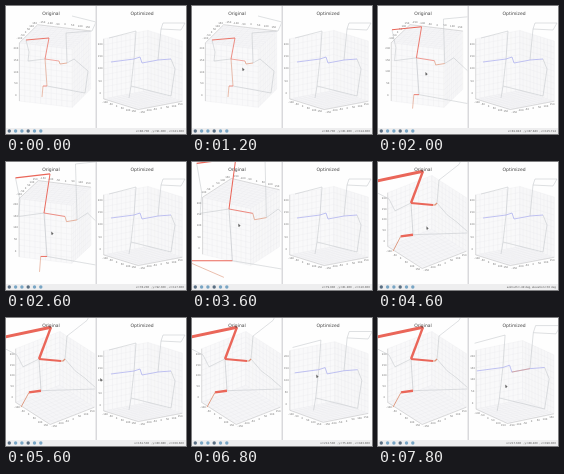
These frames come from a looping animation (180 by 128 pixels, 8000 ms). An HTML page with a canvas:

```html
<!DOCTYPE html>
<html lang="en">
<head>
<meta charset="utf-8">
<style>
html, body { margin: 0; width: 100%; height: 100%; overflow: hidden; background: #fff; }
canvas { display: block; width: 100vw; height: 100vh; }
</style>
</head>
<body>
<canvas id="stage"></canvas>
<script>
const W = 180, H = 128, LOOP = 8000, STEP = 200;
const canvas = document.getElementById('stage');
const ctx = canvas.getContext('2d');
const FONT = '"DejaVu Sans", sans-serif';
const GRAY = '#bcc0c5', RED = '#ea6659', ORANGE = '#dd9478', BLUE = '#a6a9ee';
const BASE = 56, TALL = 62;

// Joint position, zoom and tilt of the graph; turn and rise of the box in degrees.
const leftViews = [
  { t: 1200, x: 39, y: 53, zx: 1, zy: 1, tilt: 0, turn: 71, rise: -20, pen: 0.9 },
  { t: 2600, x: 38, y: 51, zx: 1.5, zy: 1.75, tilt: 0, turn: 70, rise: -20, pen: 1.2 },
  { t: 3600, x: 37, y: 47, zx: 1.7, zy: 2.2, tilt: 0, turn: 59, rise: -23, pen: 1.3 },
  { t: 4600, x: 33, y: 41, zx: 2, zy: 2, tilt: 1, turn: 52, rise: 30, pen: 3 }
];
const rightViews = [
  { t: 6200, x: 137, y: 64, zx: 1, zy: 1, tilt: 0, turn: 52, rise: 14 },
  { t: 7800, x: 135, y: 62, zx: 1.13, zy: 1.13, tilt: 0, turn: 56, rise: 18 }
];
const cursorViews = [
  { t: 0, x: 51, y: 70 }, { t: 1200, x: 51, y: 63 },
  { t: 2600, x: 46, y: 71 }, { t: 3600, x: 47, y: 63 },
  { t: 5000, x: 50, y: 67 }, { t: 6000, x: 125, y: 58 },
  { t: 6800, x: 125, y: 58 }, { t: 7800, x: 128, y: 68 }
];

// Nodes are offsets from the joint, followed by the shift at full tilt.
const leftNodes = {
  start: [-19, -19, -6, 10], bend: [4, -21, 2, 6], joint: [0, 0],
  step: [14, 2, -3, -1], drop: [15, 5, -3, -4], end: [22, 4, -9, -4],
  base: [2, 27, -1, -10], heel: [-2, 27, -3, -9], toe: [-3, 38, -6, -11],
  w1: [-16, -7, 5, 5], w2: [-17, 2, 9, 2],
  e1: [29, 0, -11, 6], e2: [43, 12, -20, -2], e3: [40, 34, -11, -18],
  n1: [21, -26, -7, 15], n2: [47, -28, -23, 10], n3: [51, -37, -23, 12], n4: [27, -43, 3, 13]
};
const rightNodes = {
  start: [-34, -32], bend: [-7, -39], joint: [-9, -11],
  base: [-12, 16], toe: [-14, 28], west: [-32, -8],
  rise: [-3, -13], drop: [-1, -7], end: [15, -10], tip: [28, -11],
  e1: [28, 26], e2: [32, -1],
  n1: [18, -41], n2: [38, -40], n3: [42, -47], n4: [20, -47]
};

const rad = deg => deg * Math.PI / 180;
const lerp = (a, b, k) => a + (b - a) * k;
const mix = (a, b, k) => [lerp(a[0], b[0], k), lerp(a[1], b[1], k)];
const bump = (t, mid, width) => Math.exp(-(((t - mid) / width) ** 2));

function viewAt(views, t) {
  const next = views.findIndex(v => v.t > t);
  if (next === 0) return views[0];
  if (next < 0) return views[views.length - 1];
  const a = views[next - 1], b = views[next];
  const k = (t - a.t) / (b.t - a.t);
  return Object.fromEntries(Object.keys(a).map(key => [key, lerp(a[key], b[key], k)]));
}

// Parts above the joint grow faster when zoomed, as they come nearer.
function place([x, y, dx = 0, dy = 0], v) {
  const py = y + dy * v.tilt;
  const near = 1 - 0.004 * (v.zy - 1) * py;
  return [v.x + (x + dx * v.tilt) * v.zx, v.y + py * v.zy * near];
}

function placeAll(nodes, v) {
  return Object.fromEntries(Object.entries(nodes).map(([name, n]) => [name, place(n, v)]));
}

function stroke(points, color, width) {
  ctx.beginPath();
  points.forEach(p => ctx.lineTo(...p));
  ctx.strokeStyle = color;
  ctx.lineWidth = width;
  ctx.stroke();
}

function path(nodes, names, color, width) {
  stroke(names.split(' ').map(n => nodes[n]), color, width);
}

function text(s, x, y, size, color, align = 'center') {
  ctx.font = size + 'px ' + FONT;
  ctx.fillStyle = color;
  ctx.textAlign = align;
  ctx.textBaseline = 'middle';
  ctx.fillText(s, x, y);
}

function pane(a, b, c, d, fill) {
  ctx.beginPath();
  [a, b, c, d].forEach(p => ctx.lineTo(...p));
  ctx.closePath();
  ctx.fillStyle = fill;
  ctx.fill();
  for (let k = 0; k <= 1.01; k += 0.1) {
    stroke([mix(a, b, k), mix(d, c, k)], '#e6e6e9', 0.3);
    stroke([mix(a, d, k), mix(b, c, k)], '#e6e6e9', 0.3);
  }
}

function edgeLabels(a, b, count, dx, dy, value) {
  for (let i = 0; i < count; i++) {
    const p = mix(a, b, (i + 0.5) / count);
    text(value(i), p[0] + dx, p[1] + dy, 2.5, '#666');
  }
}

// The level pane is the ceiling when the box is seen from below.
function drawBox(cx, cy, v) {
  const turn = rad(v.turn), rise = rad(v.rise);
  const side = v.rise < 0 ? 1 : -1;
  const corner = (x, y, z) => {
    const depth = y * Math.cos(turn) - x * Math.sin(turn);
    return [
      cx + (x * Math.cos(turn) + y * Math.sin(turn)) * BASE / 2,
      cy - z * Math.cos(rise) * TALL / 2 - depth * Math.sin(rise) * BASE / 2
    ];
  };
  const [a, c, b, d] = [[-1, -1], [-1, 1], [1, 1], [1, -1]].map(p => corner(...p, side));
  const [a2, c2, b2] = [[-1, -1], [-1, 1], [1, 1]].map(p => corner(...p, -side));
  pane(a, c, c2, a2, '#f9f9fa');
  pane(c, b, b2, c2, '#f7f7f8');
  pane(a, c, b, d, '#f5f5f7');
  stroke([a2, a, d, b], '#999', 0.3);
  edgeLabels(a, d, 6, -1.5, -side * 3, i => String(i * 50 - 100));
  edgeLabels(d, b, 7, 1, -side * 3, i => String(i * 50 - 150));
  const [top, base] = side > 0 ? [a, a2] : [a2, a];
  edgeLabels(top, base, 5, -3.5, 0, i => String(200 - i * 50));
}

function drawLeft(t) {
  const v = viewAt(leftViews, t);
  drawBox(49, 60, v);
  const n = placeAll(leftNodes, v);
  // The lower branch sweeps past the viewer during the turn.
  n.heel[0] -= 40 * bump(t, 3600, 450);
  path(n, 'start w1 w2 joint', GRAY, 0.5);
  path(n, 'end e1 e2 e3 base', GRAY, 0.5);
  path(n, 'end n1 n2 n3 n4', GRAY, 0.5);
  path(n, 'joint base', t < 2000 ? ORANGE : GRAY, 0.6);
  path(n, 'start bend', RED, v.pen);
  path(n, 'bend joint', RED, v.pen * 0.8);
  path(n, 'joint step', RED, v.pen * 0.6);
  path(n, 'step drop end', ORANGE, Math.max(0.7, v.pen * 0.4));
  path(n, 'base heel', RED, v.pen * 0.8);
  path(n, 'heel toe', ORANGE, Math.max(0.6, v.pen * 0.3));
  text('Original', 45, 8, 4.5, '#444');
}

function drawRight(t) {
  const v = viewAt(rightViews, t);
  drawBox(137, 64, v);
  const n = placeAll(rightNodes, v);
  path(n, 'start bend joint base toe', GRAY, 0.5);
  path(n, 'base e1 e2 tip', GRAY, 0.5);
  path(n, 'end n1 n2 n3 n4 n1', GRAY, 0.5);
  path(n, 'west joint rise drop end tip', BLUE, 0.7);
  if (t > 6800) path(n, 'drop end', ORANGE, 0.6);
  text('Optimized', 136, 8, 4.5, '#444');
}

function panel(x, width, draw, t) {
  ctx.save();
  ctx.beginPath();
  ctx.rect(x, 0, width, 122);
  ctx.clip();
  draw(t);
  ctx.restore();
}

function drawToolbar(t, { x, y }) {
  ctx.fillStyle = '#eeeeef';
  ctx.fillRect(0, 122, W, 6);
  for (let i = 0; i < 6; i++) {
    ctx.beginPath();
    ctx.arc(3.3 + i * 6.3, 125, 1.7, 0, Math.PI * 2);
    ctx.fillStyle = i % 3 ? '#78a5c4' : '#596e82';
    ctx.fill();
  }
  const turning = t >= 3800 && t < 5000;
  const status = turning
    ? `azimuth=${Math.round(-x)} deg, elevation=${Math.round(y / 2)} deg`
    : `x=${(x * 1.7).toFixed(3)}  , y=${(y * 1.3).toFixed(3)}  , z=${(x + y).toFixed(3)}`;
  text(status, 178, 125.3, 2.7, '#555', 'right');
}

function drawCursor({ x, y }) {
  ctx.beginPath();
  [[0, 0], [0, 3.4], [0.9, 2.7], [1.5, 3.8], [1.6, 2.4], [2.4, 2.3]]
    .forEach(([dx, dy]) => ctx.lineTo(x - 0.7 + dx, y - 1.5 + dy));
  ctx.closePath();
  ctx.fillStyle = '#666';
  ctx.fill();
}

function draw(t) {
  const dpr = window.devicePixelRatio || 1;
  const w = Math.round(innerWidth * dpr), h = Math.round(innerHeight * dpr);
  if (canvas.width !== w || canvas.height !== h) {
    canvas.width = w;
    canvas.height = h;
  }
  ctx.setTransform(w / W, 0, 0, h / H, 0, 0);
  ctx.fillStyle = '#fefefe';
  ctx.fillRect(0, 0, W, H);
  ctx.lineJoin = 'round';
  panel(0, 89.5, drawLeft, t);
  panel(91, 89, drawRight, t);
  ctx.fillStyle = '#d9d9dc';
  ctx.fillRect(89.5, 0, 1.5, 122);
  const cursor = viewAt(cursorViews, t);
  drawToolbar(t, cursor);
  if (t >= STEP) drawCursor(cursor);
}

function frame() {
  const t = performance.now() % LOOP;
  draw(Math.floor(t / STEP) * STEP);
  requestAnimationFrame(frame);
}
frame();
</script>
</body>
</html>
```
